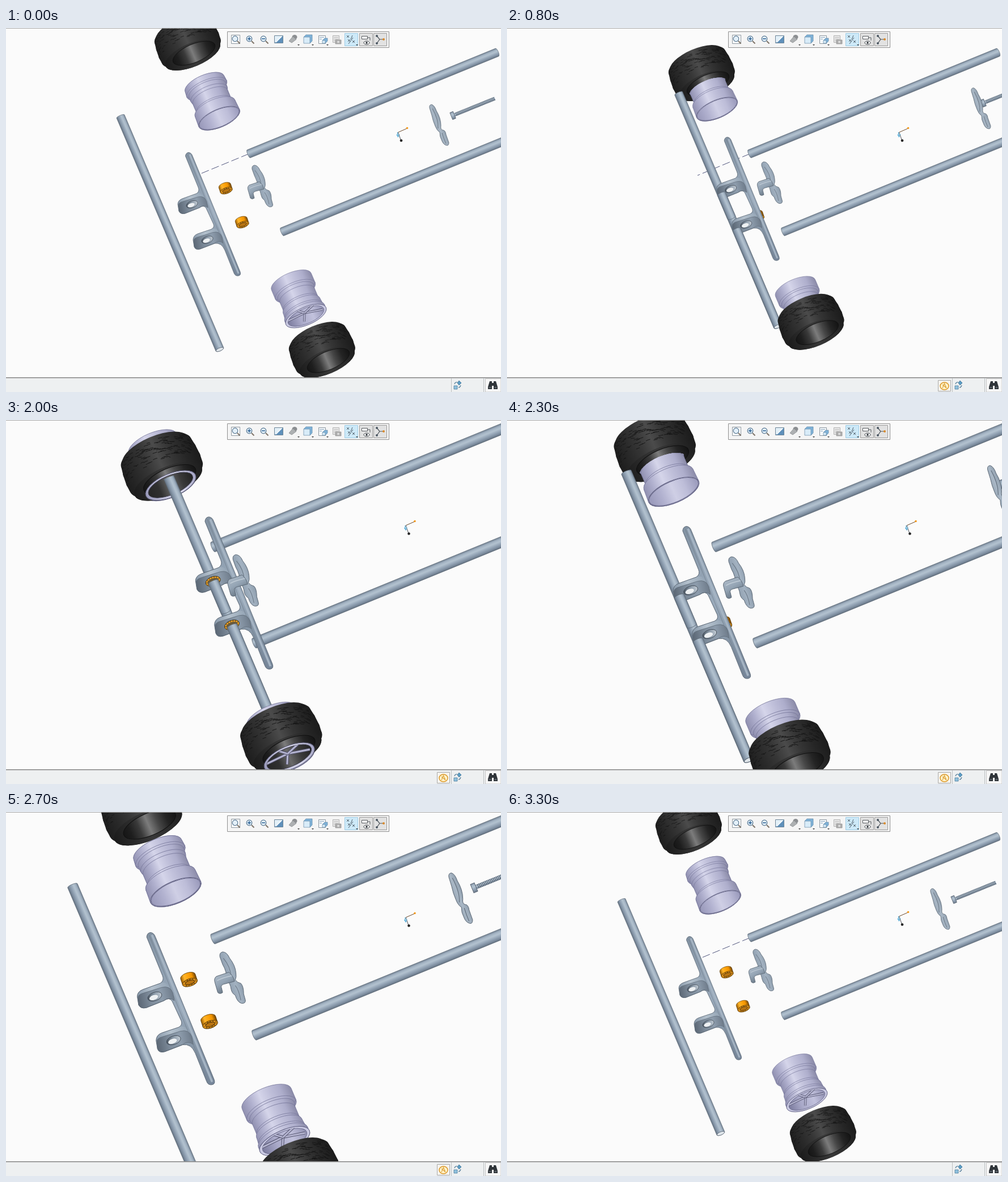
Recreate the animation shown at these times as an HTML page with a canvas. Size 873 by 642 pixels, loop 3.4 s.

```html
<!DOCTYPE html>
<html>
<head>
<meta charset="utf-8">
<style>
html,body{margin:0;width:100%;height:100%;overflow:hidden;background:#fbfbfb}
canvas{display:block}
</style>
</head>
<body>
<canvas id="stage" width="873" height="642"></canvas>
<script>
const c = document.getElementById('stage').getContext('2d');
const LOOP = 3400, TILT = -23 * Math.PI / 180, PI = Math.PI;
const EDGE = '#5a6673';
const STEEL = ['#728192', '#a3b3c3', '#b3c2cf', '#9aaabb', '#8292a4', '#647282'];
const LILAC = ['#9090b0', '#b0b0ce', '#d5d5ea', '#c0c0da', '#aeaecc', '#8b8ba8'];
const RUBBER = ['#1d1d1d', '#292929', '#363636', '#4b4b4b', '#353535', '#262626', '#1b1b1b'];

// how far each part travels from exploded to assembled
const MOVE = {
  axle: [151, -61], plate: [100, -40.5], bearing: [38, -16], hook: [22.5, -9],
  cap: [108, -44], bolt: [78, -33], tyreA: [34.5, 81], rimA: [-8.5, -24],
  rimB: [8, 17], tyreB: [-32, -74]
};

function ramp(x0, y0, x1, y1, cols) {
  const g = c.createLinearGradient(x0, y0, x1, y1);
  cols.forEach((k, i) => g.addColorStop(i / (cols.length - 1), k));
  return g;
}

function shape(d, fill, stroke, w = 0.8) {
  const p = new Path2D(d);
  if (fill) { c.fillStyle = fill; c.fill(p); }
  if (stroke) { c.strokeStyle = stroke; c.lineWidth = w; c.stroke(p); }
}

function oval(x, y, rx, ry, fill, stroke, w = 0.8, rot = 0) {
  c.beginPath();
  c.ellipse(x, y, rx, ry, rot, 0, 2 * PI);
  if (fill) { c.fillStyle = fill; c.fill(); }
  if (stroke) { c.strokeStyle = stroke; c.lineWidth = w; c.stroke(); }
}

function at(x, y, rot, draw) {
  c.save();
  c.translate(x, y);
  c.rotate(rot);
  draw();
  c.restore();
}

function part(name, e, draw) {
  const [x, y] = MOVE[name];
  at(x * (1 - e), y * (1 - e), 0, draw);
}

function rod(x0, y0, x1, y1, w, endFill) {
  const len = Math.hypot(x1 - x0, y1 - y0), h = w / 2;
  at(x0, y0, Math.atan2(y1 - y0, x1 - x0), () => {
    c.fillStyle = ramp(0, -h, 0, h, STEEL);
    c.strokeStyle = EDGE;
    c.lineWidth = 0.6;
    c.beginPath();
    c.ellipse(0, 0, 2, h, 0, PI / 2, 1.5 * PI);
    c.ellipse(len, 0, 2.5, h, 0, -PI / 2, PI / 2);
    c.closePath();
    c.fill();
    c.stroke();
    if (endFill) oval(len, 0, 2.8, h - 0.5, endFill, EDGE);
  });
}

// surface of revolution, painted from the far end to the near end
function solid(prof, k, cols, stroke) {
  for (let i = 1; i < prof.length; i++) {
    const [v0, r0] = prof[i - 1], [v1, r1] = prof[i], r = Math.max(r0, r1);
    c.beginPath();
    c.ellipse(0, v0, r0, r0 * k, 0, PI, 2 * PI);
    c.ellipse(0, v1, r1, r1 * k, 0, 0, PI);
    c.closePath();
    c.fillStyle = ramp(-r, 0, r, 0, cols);
    c.fill();
    if (stroke) { c.strokeStyle = stroke; c.lineWidth = 0.6; c.stroke(); }
  }
}

// keep what comes out of an opening along the wheel axis
function clipSweep(x, y, r, k) {
  c.translate(x, y);
  c.rotate(TILT);
  c.beginPath();
  c.ellipse(0, 0, r, r * k, 0, PI, 2 * PI);
  c.lineTo(r, 900);
  c.lineTo(-r, 900);
  c.closePath();
  c.rotate(-TILT);
  c.translate(-x, -y);
  c.clip();
}

function tyre(x, y) {
  at(x, y, TILT, () => {
    solid([[-24, 50], [-20, 54], [-8, 56], [6, 57], [17, 56], [24, 52]], 0.4, RUBBER);
    let seed = 7;
    const rnd = () => (seed = seed * 16807 % 2147483647) / 2147483647;
    c.strokeStyle = '#161616';
    c.lineWidth = 0.7;
    c.beginPath();
    for (let i = 0; i < 150; i++) {
      let a = PI * (1.06 + 0.8 * rnd()), v = -18 + 30 * rnd();
      const drift = i % 3 ? 0.6 : 2.2;
      for (let j = 0; j < 3; j++) {
        const px = 55 * Math.cos(a), py = v + 21 * Math.sin(a);
        j ? c.lineTo(px, py) : c.moveTo(px, py);
        a += 0.04 + 0.03 * rnd();
        v += drift * rnd();
      }
    }
    c.stroke();
    oval(0, 24, 52, 20.8, ramp(-52, 0, 52, 0, ['#1b1b1b', '#2a2a2a', '#383838', '#2c2c2c', '#1e1e1e']));
    oval(3, 22.5, 40, 16, ramp(-40, 0, 42, 0, ['#131313', '#1e1e1e', '#3a3a3a', '#7c7c7c', '#474747', '#242424', '#151515']), '#101010');
  });
}

const RIM_A = [[-66, 37], [-56, 38], [-54, 35], [-46, 34.5], [-41, 33], [-24, 33], [-19, 38], [0, 39]];
const RIM_B = [[-66, 38], [-48, 38], [-46, 34.5], [-40, 33], [-24, 33], [-20, 35], [-10, 36], [-6, 38], [0, 38]];

function spokes() {
  c.beginPath();
  c.ellipse(0, -0.5, 34, 13.5, 0, 0, 2 * PI);
  c.clip();
  for (let i = 0; i < 5; i++) {
    const a = i * PI * 0.4 + 0.5, px = 36 * Math.cos(a), py = 14 * Math.sin(a) - 6;
    const d = `M0 -6 L${px} ${py}`;
    shape(d, null, '#50506a', 4);
    shape(d, null, '#b4b4d0', 2.4);
  }
}

function rim(x, y, second) {
  at(x, y, TILT, () => {
    solid(second ? RIM_B : RIM_A, 0.41, LILAC, '#76769a');
    oval(0, 0, 38.5, 15.8, '#c9c9e2', '#5b5b7c');
    const cols = second ? ['#77779a', '#a9a9c8', '#c2c2dd', '#8c8cae'] : ['#9a9abb', '#b1b1cf', '#cfcfe5', '#bdbdd8', '#9c9cbd'];
    oval(0, 0, second ? 34 : 37.5, second ? 13.5 : 15, ramp(-36, 0, 36, 0, cols), '#6b6b8c');
    if (second) spokes();
  });
}

function ring(x, y, second) {
  at(x, y, TILT, () => {
    oval(0, 0, 38.5, 16.5, ramp(-38, 0, 38, 0, ['#9a9aba', '#c6c6df', '#d9d9ec', '#a5a5c5']), '#55556f');
    oval(0, -0.5, 34, 13.5, ramp(-34, 0, 34, 0, ['#262626', '#303030', '#6a6a6a', '#3a3a3a', '#222222']), '#3b3b4c');
    if (second) spokes();
  });
}

function arm(dx, dy) {
  at(dx, dy, 0, () => {
    shape('M303 312 Q303 304 311 301 L337 292 Q344 289 349 298 L353 306 L307 311 Z', ramp(303, 300, 345, 296, ['#8999aa', '#b4c1cd', '#98a8b8']));
    shape('M304 313 Q304 308 312 306 L338 298 Q350 295 354 306 L356 317 Q349 311 341 317 L316 327 Q308 329 305 323 Z',
      ramp(304, 315, 354, 305, ['#5c6876', '#7c8a99', '#8d9cac', '#6f7c8b']), EDGE, 0.6);
    oval(328, 311, 10.5, 6, ramp(318, 313, 338, 309, ['#4c5763', '#8897a6', '#c3ccd5']), '#434d58', 0.8, -0.35);
    oval(326.5, 312.5, 6.5, 3.4, '#eef1f3', null, 0, -0.35);
  });
}

function plate() {
  const d = 'M316.5 226 Q317 220 322 219.5 Q327 220 329 226 L413 430 Q415 436 410 437 Q404 438 402 432 L386 392 Q380 378 368 380 L342 390 Q334 392 332 386 L330 374 Q330 366 338 363 L362 355 Q368 352 366 346 L353 318 Q349 311 341 317 L316 327 Q308 329 305 323 L303 311 Q303 304 311 301 L336 292 Q342 288 339 281 Z';
  shape(d, ramp(317, 220, 413, 437, ['#8292a2', '#8f9fb0', '#9aaabb', '#8494a5', '#76869a']));
  arm(0, 0);
  arm(27, 62.5);
  shape('M324 223 L410 433', null, '#a5b4c3', 3);
  shape('M320 223 L405 434', null, '#717e8b', 0.6);
  shape(d, null, EDGE);
}

function bearing(x, y) {
  at(x, y, TILT + 0.08, () => {
    solid([[-4, 11], [5, 11]], 0.48, ['#9b5c00', '#ffb52b', '#ffa50e', '#f29400', '#6e4300'], '#5a3a08');
    oval(0, 5, 11, 5.2, '#f2a01c', '#5a3a08');
    oval(0, 5, 7, 3, '#b87412', '#3b2608');
    c.setLineDash([2, 2]);
    oval(0, 5, 9, 4.1, null, '#4c3210', 0.8);
    c.setLineDash([]);
  });
}

function hook() {
  const body = 'M434 249 Q433 243 438 242 Q444 242 448 251 Q456 261 457 272 Q458 278 456 282 Q459 286 464 287 Q468 291 468 302 L470.5 311 Q471 316 465 315.5 Q459 314 456 304 Q451 301 450 295 Q449 287 444 282 Q444 270 438 260 Z';
  shape(body, ramp(437, 280, 468, 270, ['#8494a5', '#a3b2c1', '#788899']), EDGE);
  shape('M439 251 Q449 263 450 277 M456 290 Q461 296 464 311', null, '#6a7785', 0.9);
  shape('M447 271 L429 277 Q425 280 427 286 L431 300 Q434 303 438 300 L436 292 Q436 289 440 288 L455 284 Q453 276 447 271 Z',
    ramp(427, 275, 442, 300, ['#adbac7', '#95a5b5', '#697785']), EDGE);
  shape('M430 283 Q437 279 451 276', null, '#c1ccd6', 1.2);
}

function cap() {
  shape('M747 141 Q746 135 751 135 Q756 137 759 146 Q767 159 767 172 Q766 179 770 180 Q775 180 776 188 L781 202 Q781 208 777 207 Q771 206 768 197 Q765 192 765 184 Q760 181 757 173 Q753 164 751 154 Z',
    ramp(749, 180, 778, 168, ['#8292a2', '#a9b7c5', '#738393']), EDGE);
  shape('M752 142 Q763 162 762 177 M769 185 Q772 195 776 204', null, '#5f6b79', 0.9);
}

function bolt() {
  at(789, 154, -0.385, () => {
    c.fillStyle = ramp(0, -3, 0, 3, STEEL);
    c.fillRect(0, -3, 79, 6);
    c.strokeStyle = '#4f5b68';
    c.lineWidth = 0.8;
    c.beginPath();
    for (let x = 5; x < 79; x += 2.4) { c.moveTo(x, -3.3); c.lineTo(x + 0.8, 3.3); }
    c.stroke();
    c.fillStyle = ramp(0, -7, 0, 7, STEEL);
    c.fillRect(-4, -6.5, 6, 13);
    c.strokeStyle = EDGE;
    c.strokeRect(-4, -6.5, 6, 13);
  });
}

function topWheel(e) {
  const done = e === 0;
  part('rimA', e, () => rim(376, 159, false));
  part('tyreA', e, () => tyre(320, 25));
  c.save();
  if (!done && e < 0.7) {
    const [x, y] = MOVE.tyreA;
    clipSweep(332 + x * (1 - e), 53 + y * (1 - e), 36, 0.41);
  }
  part('rimA', e, () => done ? ring(376, 158, false) : rim(376, 159, false));
  c.restore();
}

function bottomWheel(e) {
  part('rimB', e, () => rim(529, 508, true));
  part('tyreB', e, () => tyre(557, 567));
  if (e === 0) part('rimB', e, () => ring(529, 506, true));
}

function axle(y0, y1, endFill) {
  const x = y => 202 + (y - 156) * 175 / 411;
  rod(x(y0), y0, x(y1), y1, 15, endFill);
}

function model(e, lines) {
  const done = e === 0;
  if (lines) {
    c.setLineDash([14, 5]);
    shape('M428 222 L336 260', null, '#50557c', 1);
    c.setLineDash([]);
  }
  rod(428, 222, 866, 43, 15);
  rod(487, 359.5, 960, 166, 15);
  part('bolt', e, bolt);
  part('cap', e, cap);
  topWheel(e);
  c.save();
  if (done) clipSweep(367.5, 134.5, 33, 0.38);
  part('axle', e, () => axle(156, 567, '#dfe5ea'));
  c.restore();
  if (!done) part('bearing', e, () => { bearing(387, 282); bearing(416, 342); });
  part('plate', e, plate);
  if (done) {
    [[428, 271], [455, 333.5]].forEach(([x, y]) => {
      oval(x, y, 11, 6.5, '#6b5a3a', '#4a3a1e', 0.8, -0.35);
      c.setLineDash([2.5, 1]);
      oval(x, y, 9.5, 5, null, '#f3a21d', 2, -0.35);
      c.setLineDash([]);
    });
  }
  // the axle comes out of the lower face of each arm
  if (e < 0.6) part('axle', e, () => { axle(333, 375); axle(396, 567, '#dfe5ea'); });
  part('hook', e, hook);
  bottomWheel(e);
}

function triad(x, y) {
  at(x, y, 0, () => {
    shape('M0 0 L16 -7', null, '#6b4a2c', 1);
    shape('M0 0 L5 14', null, '#454d55', 1);
    shape('M-1 0 V6 M-2.5 4 L0 8 L2 3', null, '#49a5d4', 1.2);
    oval(16, -7.5, 1.8, 1.8, '#f59a1b');
    oval(5.5, 14.5, 2.3, 2.3, '#222222');
  });
}

function lens(x, kind) {
  if (kind === 'fit') shape(`M${x - 7.5} 12.5 h15 v15 h-15 z`, '#ffffff', '#8d979f', 1);
  oval(x - 1, 19, 4.8, 4.8, '#e3f0f9', '#587792', 1.2);
  shape(`M${x + 3} 23 l4.5 4.5`, null, '#7e7468', 2);
  if (kind !== 'fit') shape(`M${x - 4} 19 h6` + (kind === 'in' ? ` M${x - 1} 16 v6` : ''), null, '#2a5f92', 1.5);
}

function cube(x, y, s) {
  shape(`M${x} ${y} l4 -4 h${s} v${s} l-4 4 z`, '#7fb2d8', '#6488a5', 0.7);
  shape(`M${x} ${y} h${s} v${s} h-${s} z`, '#d9ecf8', '#6488a5', 0.7);
}

function toolbar() {
  shape('M390.5 6.5 h285 v28 h-285 z', '#f5f5f5', '#8f8f8f', 1);
  [[597, '#cde9f8', '#9fcde6'], [623, '#e2e2e2', '#9a9a9a'], [648, '#e2e2e2', '#9a9a9a']].forEach(([x, f, s]) =>
    shape(`M${x}.5 9.5 h23 v22 h-23 z`, f, s, 1));
  lens(405, 'fit');
  lens(430, 'in');
  lens(455, 'out');
  shape('M473.5 13.5 h15 v13 h-15 z', '#e3f0f8', '#6d8598', 1);
  shape('M474 26 L488 14 V26 Z', '#5f90ba');
  shape('M476 25 L486 15', null, '#ffffff', 1.5);
  oval(509, 16, 4.5, 4, '#8b8e91');
  shape('M499 23 L506 15 L512 20 L504 26 Z', '#adb0b2', '#8a8c8e');
  cube(525, 16, 11);
  shape('M551.5 13.5 h12 v14 h-12 z', '#f6f9fb', '#8b969f', 1);
  shape('M553 16.5 h8 M553 19.5 h4', null, '#8aa6bc', 1);
  cube(558, 22, 5);
  shape('M576.5 13.5 h11 v12 h-11 z', '#ececec', '#b0b0b0', 1);
  shape('M578 16.5 h8 M578 19.5 h8 M578 22.5 h4', null, '#b5b5b5', 1);
  shape('M581 21 h10 v7 h-10 z', '#adadad', '#969696');
  oval(586, 24.5, 2, 2, '#dddddd');
  shape('M601 13 l4 4 m0 -4 l-4 4 M611 13 l-3 7 M603 20 l4 4 m0 -4 l-4 4 M611 22 l4 4 m0 -4 l-4 4 M604 28 l8 -11', null, '#52606b', 1);
  shape('M627.5 14.5 h10 v5 h-10 z', '#ffffff', '#55595d', 1);
  shape('M638 17 h4 v5', null, '#55595d', 1);
  oval(636, 26, 5, 3, '#ffffff', '#3d4348', 1);
  oval(636, 26, 1.8, 1.8, '#2d3338');
  shape('M654 14 L659 20 L654 27 M659 20 H666', null, '#4b5359', 1.2);
  oval(654, 14, 2, 2, '#4c5864');
  oval(654, 27, 2, 2, '#4c5864');
  oval(666, 20, 2, 2, '#d98a2b');
  [514, 539, 565, 617].forEach(x => shape(`M${x} 29 h4 l-2 2 z`, '#333333'));
}

function statusBar(busy) {
  c.fillStyle = '#eef0f1';
  c.fillRect(0, 616, 873, 26);
  c.fillStyle = '#858585';
  c.fillRect(0, 616, 873, 1.5);
  shape('M785.5 618 V642 M842.5 618 V642', null, '#bcbfc1', 1);
  shape('M845.5 618.5 H873 V642 H845.5 Z', '#f7f7f7', '#c4c4c4', 1);
  if (busy) {
    shape('M760.5 621.5 h22 v19 h-22 z', '#f6f4ef', '#a9a9a9', 1);
    oval(771.5, 631.5, 7.5, 6.5, '#fff3cc', '#dc9a2b', 1.5);
    shape('M768 635 L771.5 627 L775 635 M768 629 L775 635', null, '#dca23a', 1.2);
  }
  shape('M790 631 h6 v6 h-6 z', '#8fc0dd', '#4b7c9c');
  shape('M796 626 L799 622 L803 626 L799 630 Z', '#5a9cc4', '#3f7396');
  shape('M791 628 Q792 624 796 625 M802 630 Q801 634 798 634', null, '#4a7592', 1.1);
  shape('M853 623 h4 v3 h3 v-3 h4 l3 10 v4 h-7 v-6 h-3 v6 h-7 v-4 z', '#30353a');
  shape('M851.5 634 h4 M861.5 634 h4', null, '#8b959d', 1.2);
}

function render(t) {
  t = Math.floor(t / 100) * 100;
  const steps = start => Math.min(6, Math.max(0, Math.floor((t - start) / 133)));
  const e = (t < 1500 ? 6 - steps(267) : steps(2033)) / 6;
  const near = t >= 1200 && t < 3000;
  const busy = (t >= 200 && t < 1200) || (t >= 1900 && t < 3000);
  c.fillStyle = '#fbfbfb';
  c.fillRect(0, 0, 873, 642);
  c.save();
  c.beginPath();
  c.rect(0, 1, 873, 615);
  c.clip();
  if (near) { c.translate(-163, -50); c.scale(1.234, 1.234); }
  model(e, !near && e > 0);
  c.restore();
  near ? triad(705, 186) : triad(691.5, 184);
  c.fillStyle = '#a9a9a9';
  c.fillRect(0, 0, 873, 1);
  toolbar();
  statusBar(busy);
}

const begin = performance.now();
function tick() {
  render((performance.now() - begin) % LOOP);
  requestAnimationFrame(tick);
}
tick();
</script>
</body>
</html>
```
